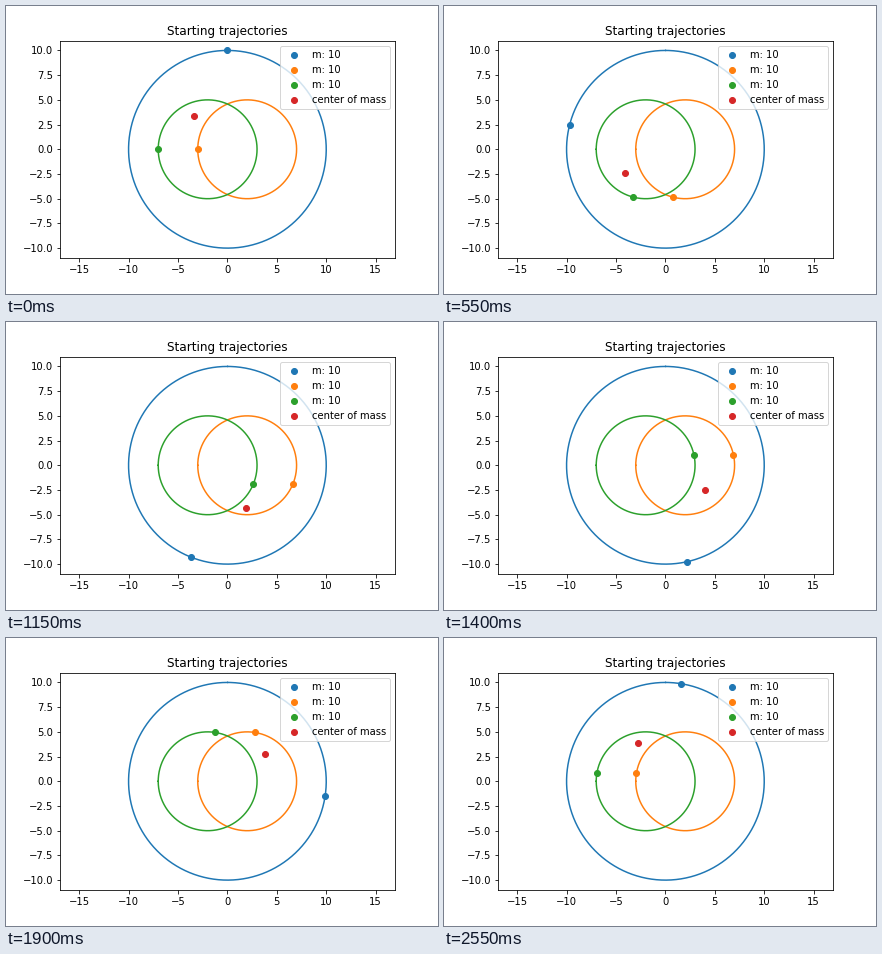
Animation, 432 px wide and 288 px high, one loop 2600 ms. Source, as a matplotlib script:

```python
import numpy as np
import matplotlib.pyplot as plt
from matplotlib.animation import FuncAnimation

FRAMES = 52
STEP = 0.12  # radians travelled per frame

plt.rcParams["font.family"] = "DejaVu Sans"


def outer(t):
    return -10 * np.sin(t), 10 * np.cos(t)


def right(t):
    return 2 - 5 * np.cos(t), -5 * np.sin(t)


def left(t):
    return -2 - 5 * np.cos(t), -5 * np.sin(t)


ORBITS = (outer, right, left)
MASSES = (10, 10, 10)

fig = plt.figure(figsize=(6, 4), dpi=72)
fig.subplots_adjust(left=0.125, right=0.9, bottom=0.125, top=0.88)
ax = fig.add_subplot()

path_t = np.arange(0, 2 * np.pi, 0.01)
bodies = []
for i, (orbit, mass) in enumerate(zip(ORBITS, MASSES)):
    ax.plot(*orbit(path_t), color=f"C{i}")
    bodies.append(ax.scatter(*orbit(0), color=f"C{i}", label=f"m: {mass}"))
center = ax.scatter(0, 0, color="C3", label="center of mass")

# Equal scale on both axes, filling the axes box
box = ax.get_position()
half_x = 11 * (box.width * 6) / (box.height * 4)
ax.set_xlim(-half_x, half_x)
ax.set_ylim(-11, 11)
ax.set_xticks(range(-15, 16, 5))
ax.set_yticks(np.arange(-10, 10.1, 2.5))
ax.set_title("Starting trajectories")
legend = ax.legend(loc="upper right")


def update(frame):
    points = np.array([orbit(frame * STEP) for orbit in ORBITS])
    for body, point in zip(bodies, points):
        body.set_offsets([point])
    center.set_offsets([np.average(points, axis=0, weights=MASSES)])

    # The legend steps aside while the outer body passes behind it
    x, y = points[0]
    legend.set_loc("upper left" if x > 5.3 and y > 4 else "upper right")
    return [*bodies, center, legend]


anim = FuncAnimation(fig, update, frames=FRAMES, interval=50,
                     repeat=True, repeat_delay=0, blit=False)
plt.show()
```
